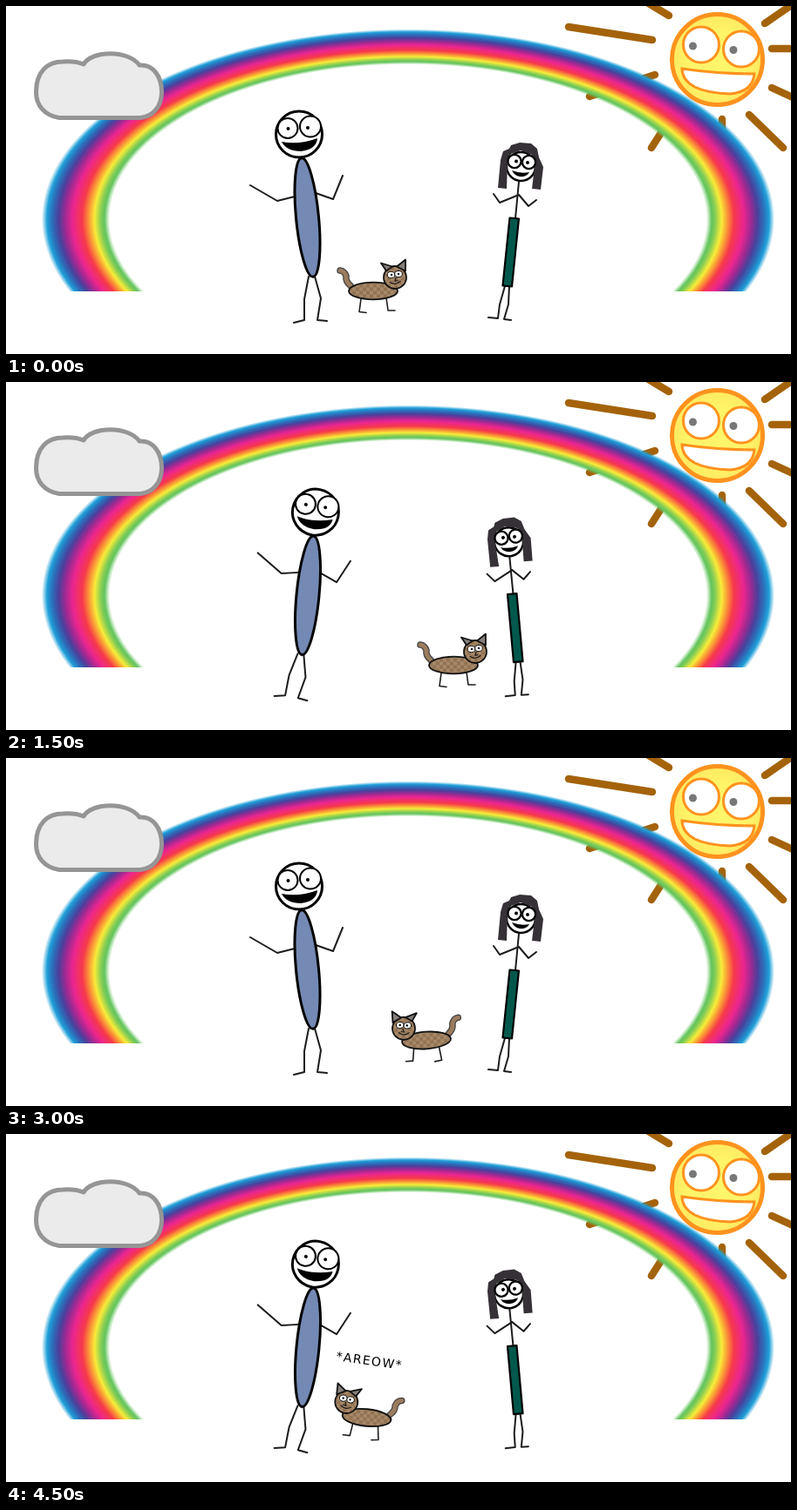
An HTML page for the animation above (5 s loop, 900x400 px).

```html
<!DOCTYPE html>
<html lang="en">
<head>
<meta charset="utf-8">
<title>Rainbow dance</title>
<style>
  html, body { margin: 0; width: 100%; height: 100%; overflow: hidden; background: #fff; }
  svg { display: block; width: 100%; height: 100%; }
  .line { fill: none; stroke: #1c1c1c; stroke-width: 2; stroke-linecap: round; stroke-linejoin: round; }
  .ink { stroke: #000; stroke-width: 3; fill: #fff; }
  .rays { stroke: #a4630a; stroke-width: 8.5; stroke-linecap: round; }
  .sun { stroke: #ff921e; stroke-width: 3; fill: #fff; }
  .fur { stroke: #111; stroke-width: 1.8; fill: url(#fur); }
  text { font: 14px "DejaVu Sans", sans-serif; letter-spacing: 1.4px; }
</style>
</head>
<body>
<svg viewBox="0 0 900 400">
  <defs>
    <radialGradient id="bow">
      <stop offset=".803" stop-color="#6ac860" stop-opacity="0"/>
      <stop offset=".817" stop-color="#62c45e"/>
      <stop offset=".826" stop-color="#80cc56"/>
      <stop offset=".844" stop-color="#f8ec38"/>
      <stop offset=".86" stop-color="#fa9436"/>
      <stop offset=".877" stop-color="#f6394a"/>
      <stop offset=".903" stop-color="#ec2590"/>
      <stop offset=".924" stop-color="#9a2a92"/>
      <stop offset=".941" stop-color="#4a409c"/>
      <stop offset=".958" stop-color="#2a70ba"/>
      <stop offset=".972" stop-color="#1fa0d8"/>
      <stop offset=".986" stop-color="#1fa0d8" stop-opacity="0"/>
    </radialGradient>
    <radialGradient id="glow">
      <stop offset=".6" stop-color="#fff56a"/>
      <stop offset="1" stop-color="#ffea60"/>
    </radialGradient>
    <pattern id="fur" width="8" height="8" patternUnits="userSpaceOnUse">
      <path fill="#a78868" d="M0 0h8v8H0z"/>
      <path fill="#917354" d="M0 0h4v4H0zM4 4h4v4H4z"/>
    </pattern>
    <clipPath id="ground"><path d="M0 0H900V328H0z"/></clipPath>
  </defs>

  <path class="rays" d="M645 24 741 39M735-4 760 11M870 20 902-2M878 49H904M878 94 904 106M852 125 891 163M821 130V150M756 138 740 163M744 79 669 104"/>
  <ellipse cx="461" cy="245" rx="426" ry="221.5" fill="url(#bow)" clip-path="url(#ground)"/>

  <g class="sun">
    <circle cx="815.5" cy="61.5" r="52" style="fill:url(#glow);stroke-width:5"/>
    <circle cx="797" cy="44.5" r="20.5"/>
    <circle cx="843" cy="49.5" r="20.5"/>
    <path d="M775 72Q815 78 858 78Q856 99 830 101Q776 99 775 72Z"/>
    <g fill="#777" stroke="none"><circle cx="787.5" cy="46" r="4.5"/><circle cx="834" cy="50.5" r="4.5"/></g>
  </g>

  <path fill="#ebebeb" stroke="#959595" stroke-width="5" stroke-linejoin="round"
    d="M61 128.5C44 126 34.5 114 34.5 99C34.5 75 48 64 65 64Q80 63 89 67C98 51 140 50 153 68C169 67 178.5 81 178.5 99C178.5 115 169 127 154 128.5Z"/>

  <g id="man">
    <path class="line" d="M331 219 311 224 280 206M355 215 375 222 386 195M347 311 342 337 342 361 330 364M354 311 361 336 357 361 368 362"/>
    <ellipse class="ink" cx="345.5" cy="243" rx="13" ry="68.5" transform="rotate(-5.5 345.5 243)" style="fill:#7489b4"/>
    <circle class="ink" cx="336" cy="147.5" r="26.5"/>
    <g class="ink" style="stroke-width:2"><circle cx="323" cy="140.5" r="11.5"/><circle cx="349" cy="138.5" r="12"/></g>
    <circle cx="323.5" cy="141" r="2"/><circle cx="346" cy="140" r="2"/>
    <path d="M316 156Q336 160 357 152Q356 165 338 167Q322 167 316 156Z"/>
  </g>

  <g id="woman">
    <path class="line" d="M588 202 584 244M588 217 566 226 559 216M588 217 599 230 608 223M572 322 566 343 564 359 553 358M577 322 576 343 571 360 579 361"/>
    <path class="ink" stroke-linejoin="round" d="M577.5 243.5 588 244.5 580 322.5 569.5 321.5Z" style="fill:#00584c;stroke-width:2.2"/>
    <circle class="ink" cx="590.5" cy="184.5" r="16.5" style="stroke-width:2.5"/>
    <path fill="#353136" d="M564 209 567 177 570 167 577 164 579 160 589 157 602 158 609 164 611 174 616 185 613 211 603 210 606 184 603 171 590 166 579 170 575 180 574 210Z"/>
    <g class="ink" style="stroke-width:2.3"><circle cx="583" cy="178.5" r="7.6"/><circle cx="599.5" cy="179.5" r="7.6"/></g>
    <circle cx="585" cy="178.5" r="2"/><circle cx="598" cy="180" r="2"/>
    <path d="M580 189Q590 193 600 191Q597 197 589 196Q583 195 580 189Z"/>
  </g>

  <g id="cat">
    <path class="line" style="stroke-width:1.6" d="M-14 9-16 24-8 25M15 8 17 22.5 25 22.5"/>
    <g fill="none" stroke-linecap="round">
      <path stroke="#444" stroke-width="7.5" d="M-26-6Q-32-11-31-17Q-33-23-38-23.5"/>
      <path stroke="#9b7c5e" stroke-width="5" d="M-26-6Q-32-11-31-17Q-33-23-38-23.5"/>
    </g>
    <ellipse class="fur" rx="28" ry="9.8"/>
    <circle class="fur" cx="25" cy="-15.5" r="13"/>
    <path fill="#857f7b" stroke="#111" stroke-width="1.8" stroke-linejoin="round" d="M15-23 9-32 22-28ZM27-28 37-36 37-23Z"/>
    <g fill="#fff" stroke="#111"><ellipse cx="20.5" cy="-18.5" rx="4.3" ry="3.6"/><ellipse cx="29" cy="-19.5" rx="4.3" ry="3.6"/></g>
    <circle cx="21" cy="-18.5" r="1.2"/><circle cx="29" cy="-19.5" r="1.2"/>
    <path class="line" style="stroke-width:1.2" d="M19-10Q25-6 31-11M26-15 25-11 28-12"/>
  </g>
  <text id="meow" x="378" y="260" transform="rotate(8 378 260)">*AREOW*</text>
</svg>
<script>
  const STEP = 500;
  const [man, woman, cat, meow] = ["man", "woman", "cat", "meow"].map(id => document.getElementById(id));

  // Cat's x, y and tilt at each step; it walks right, then left.
  const walk = [
    [421, 327.5, 0], [451, 327, 0], [481, 326, -2], [513, 325.5, 0], [520, 326, -5],
    [511, 326, 0], [482, 324.5, -4], [456, 325, 0], [434, 325, -3], [413.5, 326, 6]
  ];

  function sway(figure, cx, cy, angle, dx, dy, leaning) {
    figure.setAttribute("transform",
      leaning ? `translate(${dx} ${dy}) rotate(${angle} ${cx} ${cy})` : "");
  }

  function draw() {
    const step = Math.floor(performance.now() / STEP) % walk.length;
    const leaning = step % 2 === 1;
    const [x, y, tilt] = walk[step];
    const facing = step < walk.length / 2 ? 1 : -1;
    sway(man, 345.5, 243, 11, 0.5, 2.2, leaning);
    sway(woman, 578.5, 283, -11, 5, -0.3, leaning);
    cat.setAttribute("transform", `translate(${x} ${y}) rotate(${tilt}) scale(${facing} 1)`);
    meow.style.display = step === walk.length - 1 ? "" : "none";
    requestAnimationFrame(draw);
  }
  draw();
</script>
</body>
</html>
```
